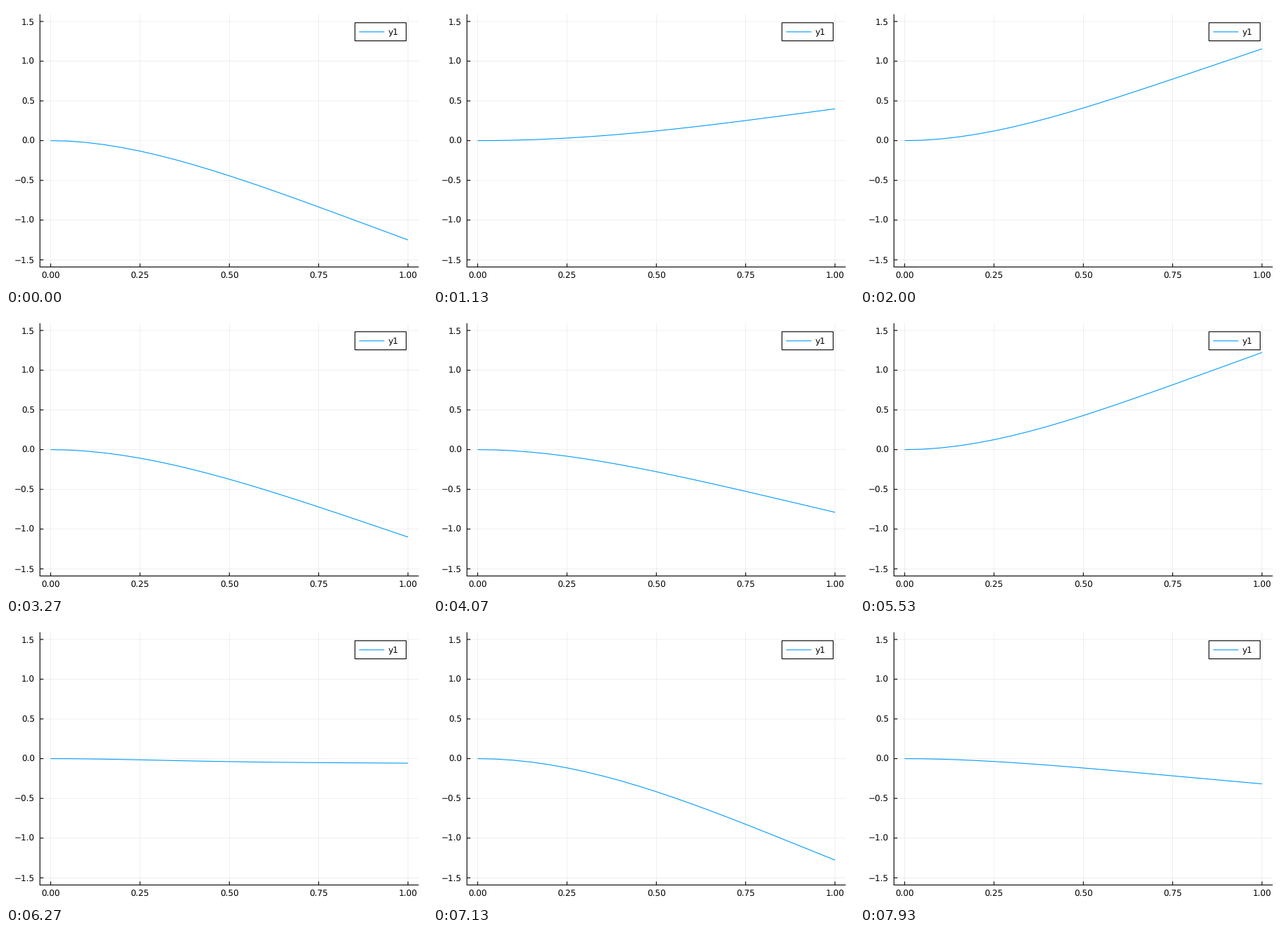
Recreate the animation shown at these times as a matplotlib script. Size 600x400 px, loop 8 s.

```python
import numpy as np
import matplotlib.pyplot as plt
from matplotlib.animation import FuncAnimation
from matplotlib.patches import Rectangle

W, H, DPI = 600, 400, 100
FRAMES, LOOP = 120, 8000
PT = 72 / DPI                      # points per pixel
BLUE = "#009AFA"
LEFT, RIGHT, TOP, BOTTOM = 48.4, 588.2, 11.8, 371.5
DT = 10 / 299                      # model time per frame
LOAD = 10                          # uniform load released at t = 0

plt.rcParams.update({
    "font.family": "DejaVu Sans",
    "font.size": 12 * PT,
    "text.hinting": "none",
    "toolbar": "None",
})


def px(x):
    return LEFT + (x + 0.03) / 1.06 * (RIGHT - LEFT)


def py(y):
    return TOP + (1.59 - y) / 3.18 * (BOTTOM - TOP)


# Bending modes of a clamped beam, weighted by its static sag
beta = np.array([1.87510407, 4.69409113, 7.85475744, 10.99554073])
sigma = (np.cosh(beta) + np.cos(beta)) / (np.sinh(beta) + np.sin(beta))
x = np.linspace(0, 1, 21)
bx = np.outer(x, beta)
shapes = np.cosh(bx) - np.cos(bx) - sigma * (np.sinh(bx) - np.sin(bx))
weights = -2 * LOAD * sigma / beta**5


def deflection(t):
    return shapes @ (weights * np.cos(beta**2 * t))


fig = plt.figure(figsize=(W / DPI, H / DPI), dpi=DPI, facecolor="white")
ax = fig.add_axes([0, 0, 1, 1])
ax.set_xlim(0, W)
ax.set_ylim(H, 0)
ax.axis("off")


def line(xs, ys, color="black", width=1.1, z=2, **kw):
    return ax.plot(xs, ys, color=color, lw=width * PT, zorder=z, snap=False,
                   solid_capstyle="butt", solid_joinstyle="round", **kw)[0]


def label(x0, base, text, align):
    ax.text(x0, base, text, ha=align, va="baseline", color="black", zorder=6)


for v in np.arange(0, 1.01, 0.25):
    line([px(v)] * 2, [TOP, BOTTOM], width=0.6, z=1, alpha=0.1)
    line([px(v)] * 2, [BOTTOM, BOTTOM - 5])
    label(px(v), 387.6, f"{v:.2f}", "center")

for v in np.arange(-1.5, 1.6, 0.5):
    line([LEFT, RIGHT], [py(v)] * 2, width=0.6, z=1, alpha=0.1)
    line([LEFT, LEFT + 5], [py(v)] * 2)
    label(41, py(v) + 4.4, f"{v:.1f}".replace("-", "\u2212"), "right")

line([LEFT, LEFT], [TOP, BOTTOM + 0.5])
line([LEFT - 0.5, RIGHT], [BOTTOM, BOTTOM])

# Legend
ax.add_patch(Rectangle((497.3, 23.8), 73, 25.8, fc="white", ec="black",
                       lw=1.1 * PT, zorder=4, snap=False))
line([503.3, 539.3], [36.8, 36.8], BLUE, z=5)
label(544.6, 41.2, "y1", "left")

beam = line(px(x), py(deflection(0)), BLUE, z=3)


def update(i):
    beam.set_ydata(py(deflection(i * DT)))
    return [beam]


anim = FuncAnimation(fig, update, frames=FRAMES, interval=LOOP / FRAMES,
                     repeat=True, repeat_delay=0, cache_frame_data=False)
plt.show()
```
